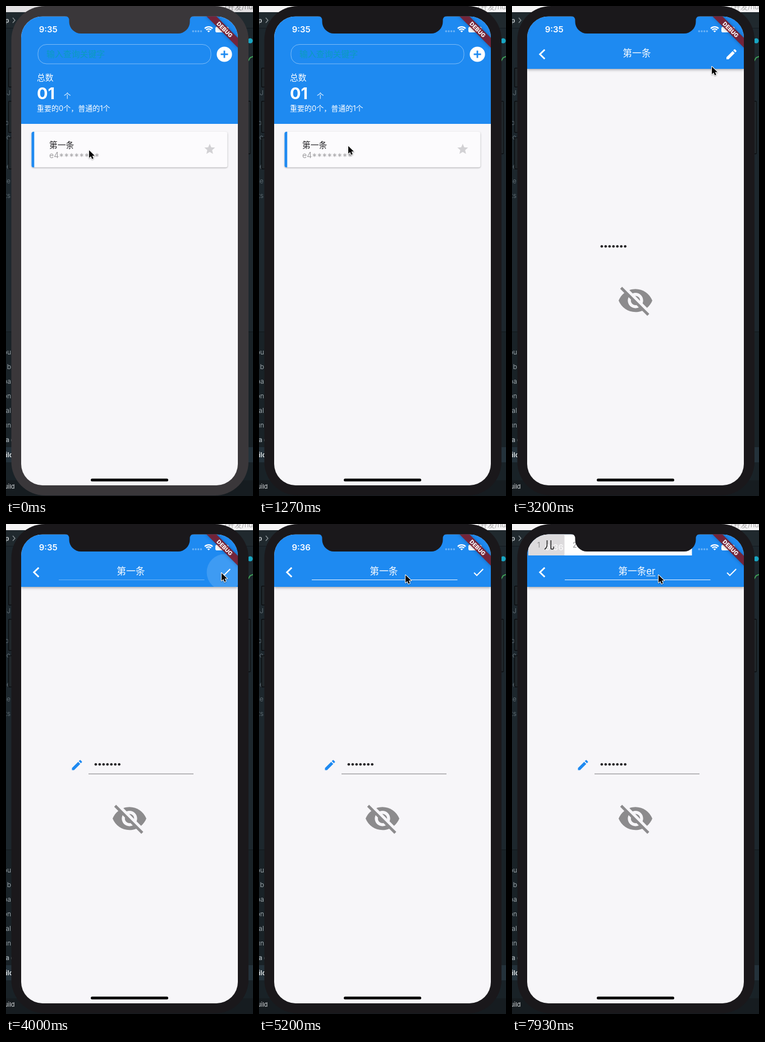
Recreate the animation shown at these times as an HTML page with a canvas. Size 440 by 873 pixels, loop 8 s.

```html
<!DOCTYPE html>
<html lang="zh-CN">
<head>
<meta charset="utf-8">
<style>
html, body { margin: 0; width: 100%; height: 100%; overflow: hidden; background: #1c2429; }
canvas { display: block; width: 440px; height: 873px; }
</style>
</head>
<body>
<canvas id="stage"></canvas>
<script>
const W = 440, H = 873, LOOP = 8000;
const SCR = { x: 27, y: 18.5, w: 386, h: 835.5 };
const BLUE = '#1e8af1', PAPER = '#f7f6f9';
const FONT = 'Inter, "Noto Sans CJK SC", "Noto Sans CJK", "Noto Sans", sans-serif';

const canvas = document.getElementById('stage');
const dpr = window.devicePixelRatio || 1;
canvas.width = W * dpr;
canvas.height = H * dpr;
const c = canvas.getContext('2d');

const ICON = {
  edit: new Path2D('M3 17.25V21h3.75L17.81 9.94l-3.75-3.75L3 17.25zM20.71 7.04a1 1 0 0 0 0-1.41l-2.34-2.34a1 1 0 0 0-1.41 0l-1.83 1.83 3.75 3.75 1.83-1.83z'),
  check: new Path2D('M9 16.17L4.83 12l-1.42 1.41L9 19 21 7l-1.41-1.41z'),
  hidden: new Path2D('M12 7c2.76 0 5 2.24 5 5 0 .65-.13 1.26-.36 1.83l2.92 2.92c1.51-1.26 2.7-2.89 3.43-4.75-1.73-4.39-6-7.5-11-7.5-1.4 0-2.74.25-3.98.7l2.16 2.16C10.74 7.13 11.35 7 12 7zM2 4.27l2.28 2.28.46.46C3.08 8.3 1.78 10.02 1 12c1.73 4.39 6 7.5 11 7.5 1.55 0 3.03-.3 4.38-.84l.42.42L19.73 22 21 20.73 3.27 3 2 4.27zM7.53 9.8l1.55 1.55c-.05.21-.08.43-.08.65 0 1.66 1.34 3 3 3 .22 0 .44-.03.65-.08l1.55 1.55c-.67.33-1.41.53-2.2.53-2.76 0-5-2.24-5-5 0-.79.2-1.53.53-2.2zm4.31-.78l3.15 3.15.02-.16c0-1.66-1.34-3-3-3l-.17.01z'),
  star: new Path2D('M12 17.27L18.18 21l-1.64-7.03L22 9.24l-7.19-.61L12 2 9.19 8.63 2 9.24l5.46 4.73L5.82 21z'),
  arrow: new Path2D('M0 0V13.6L3.2 10.7L5.3 15.5L7.8 14.4L5.7 9.7H10z')
};

// Event times in ms
const T = { active: 1000, push: 1480, edit: 3840, press: 3760, release: 4060, minute: 4500, focus: 5070, typeE: 7500, typeR: 7670 };

// Pointer stops: time, x, y
const POINTER = [
  [0, 148, 257], [350, 159, 249.5], [1600, 159, 249.5], [1800, 160, 251],
  [2500, 160, 251], [3400, 384, 87.5], [4180, 384, 87.5], [4900, 261, 91], [LOOP, 261, 91]
];

const clamp = v => Math.max(0, Math.min(1, v));
const span = (t, from, len) => clamp((t - from) / len);
const easeOut = p => 1 - (1 - p) ** 3;
const easeBoth = p => p * p * (3 - 2 * p);

function rect(x, y, w, h, color) {
  c.fillStyle = color;
  c.fillRect(x, y, w, h);
}

function round(x, y, w, h, r, color) {
  c.beginPath();
  c.roundRect(x, y, w, h, r);
  c.fillStyle = color;
  c.fill();
}

function disc(x, y, r, color) {
  c.beginPath();
  c.arc(x, y, r, 0, 2 * Math.PI);
  c.fillStyle = color;
  c.fill();
}

function line(points, color, width) {
  c.beginPath();
  points.forEach(([x, y]) => c.lineTo(x, y));
  c.strokeStyle = color;
  c.lineWidth = width;
  c.stroke();
}

function text(s, x, y, size, color, weight = 400, align = 'left') {
  c.font = `${weight} ${size}px ${FONT}`;
  c.textAlign = align;
  c.fillStyle = color;
  c.fillText(s, x, y);
}

function icon(path, x, y, scale, color) {
  c.save();
  c.translate(x, y);
  c.scale(scale, scale);
  c.fillStyle = color;
  c.fill(path);
  c.restore();
}

function shadow(color, blur, dy) {
  c.shadowColor = color;
  c.shadowBlur = blur * dpr;
  c.shadowOffsetY = dy * dpr;
}

function desktop(active) {
  rect(0, 0, W, H, '#1d272d');
  rect(0, 0, W, 11, active ? '#f5f4f5' : '#e2e0e2');
  text('/开发/nu', 440, 6, 13, active ? '#a9a8a9' : '#858485', 400, 'right');
  rect(0, 11, W, 28, '#20292e');
  rect(0, 39, W, 1, '#151b1f');
  text('p', -2, 30, 12, '#b4babd', 700);
  line([[12, 21], [16, 25.5], [12, 30]], '#8d9599', 1.3);
  rect(0, 580, W, 1, '#11171a');
  rect(0, 581, W, 264, '#192227');
  rect(0, 786, W, 27, '#24323b');
  rect(0, 845, W, 28, '#161c20');
  [['dJ', 159], ['ol', 212], ['po', 238], ['e', 290], ['de', 316], ['ts', 342]]
    .forEach(([s, y]) => text(s, 8, y, 12, '#5a666d', 400, 'right'));
  ['ou', 'b', 'oa', 'on', 'al', 'un', 'a c'].forEach((s, i) =>
    text(s, i === 6 ? -1 : 9, 621 + i * 26, 12, '#98a1a6', i === 6 ? 700 : 400, i === 6 ? 'left' : 'right'));
  text('uild', -8, 804, 12, '#e4e8ea', 600);
  text('uild', -3, 860, 11, '#d5d9db');
  disc(435, 62, 4.5, '#18a7c4');
  line([[430, 100], [435, 92], [440, 90]], '#3f9f57', 2);
}

function sideButton(x, y, h) {
  round(x, y, 7, h, 2, '#080a0c');
  round(x + 1.2, y + 1.2, 5, h - 2.4, 1, '#20272b');
}

function phone(color) {
  [[110, 35], [169, 57], [234, 57]].forEach(([y, h]) => sideButton(4, y, h));
  sideButton(429, 169, 95);
  round(9.5, 0, 422.5, 872, 60, color);
}

function notch(color) {
  c.beginPath();
  c.moveTo(105, 18);
  c.quadraticCurveTo(112.5, 18, 112.5, 26);
  c.arcTo(112.5, 49, 134, 49, 21);
  c.arcTo(327.5, 49, 327.5, 26, 21);
  c.lineTo(327.5, 26);
  c.quadraticCurveTo(327.5, 18, 335, 18);
  c.fillStyle = color;
  c.fill();
}

function listPage() {
  rect(SCR.x, SCR.y, SCR.w, SCR.h, PAPER);
  rect(SCR.x, SCR.y, SCR.w, 191.5, BLUE);
  c.beginPath();
  c.roundRect(57, 68.5, 308, 34.5, 15);
  c.strokeStyle = 'rgba(255,255,255,.42)';
  c.lineWidth = 1;
  c.stroke();
  text('输入查询关键字', 72, 91, 14.9, '#0b9cbd');
  disc(389, 86, 13.6, '#fff');
  rect(382.5, 84.6, 13, 2.8, BLUE);
  rect(387.6, 79.5, 2.8, 13, BLUE);
  text('总数', 55, 133, 14.8, '#fff');
  text('01', 55, 165.5, 29, '#fff', 700);
  text('个', 103, 165, 12.5, '#fff');
  text('重要的0个，普通的1个', 55, 187, 13, '#fff');

  c.save();
  shadow('rgba(0,0,0,.32)', 2.5, 1);
  round(45.5, 224, 349, 63.5, 3.5, '#fcfbfd');
  c.restore();
  round(45.5, 224, 4.8, 63.5, [3.5, 0, 0, 3.5], BLUE);
  text('第一条', 77, 252.5, 14.8, '#242326');
  text('e4********', 77, 271, 14, '#a09fa2');
  icon(ICON.star, 351.5, 243.5, 0.95, '#d2d1d4');
}

function detailPage(t) {
  const editing = t >= T.edit, focused = t >= T.focus;
  rect(SCR.x, SCR.y, SCR.w, SCR.h, PAPER);
  c.save();
  shadow('rgba(0,0,0,.35)', 5, 2);
  rect(SCR.x, SCR.y, SCR.w, 93.5, BLUE);
  c.restore();

  line([[58.3, 77.8], [49.8, 86], [58.3, 94.2]], '#fff', 2.9);

  if (t >= T.press && t < T.release + 220) {
    const grow = easeOut(span(t, T.press, 220));
    const fade = 1 - span(t, T.release, 220);
    c.save();
    c.beginPath();
    c.rect(SCR.x, SCR.y, SCR.w, 93.5);
    c.clip();
    disc(390, 86, 10 + 22.5 * grow, `rgba(255,255,255,${0.14 * fade})`);
    c.restore();
  }
  icon(editing ? ICON.check : ICON.edit, 379, 74, 1, '#fff');

  const typed = t >= T.typeR ? 'er' : t >= T.typeE ? 'e' : '';
  const title = '第一条' + typed;
  text(title, 222.3, 89.8, 16.7, '#fff', 400, 'center');
  if (typed) {
    const end = 222.3 + c.measureText(title).width / 2;
    rect(end - c.measureText(typed).width, 92, c.measureText(typed).width, 1, '#fff');
  }
  if (editing) {
    rect(94, 99, 259.5, 1, focused ? 'rgba(255,255,255,.92)' : 'rgba(255,255,255,.36)');
    icon(ICON.edit, 114.5, 417.5, 1, BLUE);
    rect(147, 444.7, 187, 1, '#7c7b7e');
  }
  for (let i = 0; i < 7; i++) disc(159.9 + i * 6.95, 428.3, 2.3, '#242326');
  icon(ICON.hidden, 187.2, 492, 2.73, '#8c8b8d');
}

function pages(t) {
  const p = easeOut(span(t, T.push, 400));
  if (p < 1) {
    c.save();
    c.translate(-SCR.w / 3 * p, 0);
    listPage();
    c.restore();
    // The sliding parallax leaves no gap: the next page covers the right side
  }
  if (p > 0) {
    const x = SCR.w * (1 - p);
    if (p < 1) {
      const g = c.createLinearGradient(SCR.x + x - 18, 0, SCR.x + x, 0);
      g.addColorStop(0, 'rgba(0,0,0,0)');
      g.addColorStop(1, 'rgba(0,0,0,.12)');
      rect(SCR.x + x - 18, SCR.y, 18, SCR.h, g);
    }
    c.save();
    c.translate(x, 0);
    detailPage(t);
    c.restore();
  }
}

function banner() {
  c.save();
  c.translate(413, 18.5);
  c.rotate(Math.PI / 4);
  c.save();
  shadow('rgba(0,0,0,.5)', 6, 0);
  rect(-42, 27, 84, 12.3, 'rgba(60,22,42,.6)');
  c.restore();
  rect(-42, 27, 84, 12.3, 'rgba(150,28,38,.66)');
  text('DEBUG', 0, 36.9, 10, '#fff', 800, 'center');
  c.restore();
}

function candidates() {
  rect(29, 18, 291.5, 38, '#fefefe');
  rect(29, 18, 64.5, 38, '#dddbdd');
  text('1', 45, 42, 12.5, '#8f8e90');
  text('2', 108, 42, 12.5, '#8f8e90');
}

function statusBar(t) {
  const ime = t >= T.typeE;
  if (ime) candidates();
  const clock = t < T.minute ? '9:35' : '9:36';
  text(clock, 75.2, 47.2, 15, ime ? 'rgba(255,255,255,.75)' : '#fff', 600, 'center');
  if (ime) text('儿', 57, 43.5, 18.5, '#111');
  for (let i = 0; i < 4; i++) disc(333.3 + i * 4.7, 45, 1.7, 'rgba(255,255,255,.36)');
  [[9.8, 2.3], [6.2, 2.2], [1.7, 3.4]].forEach(([r, w]) => {
    c.beginPath();
    c.arc(361, 47, r, -Math.PI * 0.75, -Math.PI * 0.25);
    c.strokeStyle = '#fff';
    c.lineWidth = w;
    c.stroke();
  });
  round(373, 37, 23.5, 10, 2.8, '#fff');
}

function pointer(t) {
  const i = POINTER.findIndex((k, n) => n > 0 && t <= k[0]);
  const [t0, x0, y0] = POINTER[i - 1], [t1, x1, y1] = POINTER[i];
  const p = easeBoth(span(t, t0, t1 - t0));
  c.save();
  c.translate(x0 + (x1 - x0) * p, y0 + (y1 - y0) * p);
  c.save();
  shadow('rgba(0,0,0,.35)', 2, 1);
  c.strokeStyle = '#fff';
  c.lineWidth = 2;
  c.lineJoin = 'round';
  c.stroke(ICON.arrow);
  c.restore();
  c.fillStyle = '#050505';
  c.fill(ICON.arrow);
  c.restore();
}

function draw(t) {
  const active = t >= T.active;
  const bezel = active ? '#1a181b' : '#3a373a';
  c.setTransform(dpr, 0, 0, dpr, 0, 0);
  desktop(active);
  phone(bezel);
  c.save();
  c.beginPath();
  c.roundRect(SCR.x, SCR.y, SCR.w, SCR.h, 38);
  c.clip();
  pages(t);
  statusBar(t);
  banner();
  round(151, 842, 138, 5, 2.5, '#000');
  c.restore();
  notch(bezel);
  pointer(t);
}

const start = performance.now();
function tick() {
  draw((performance.now() - start) % LOOP);
  requestAnimationFrame(tick);
}
tick();
</script>
</body>
</html>
```
